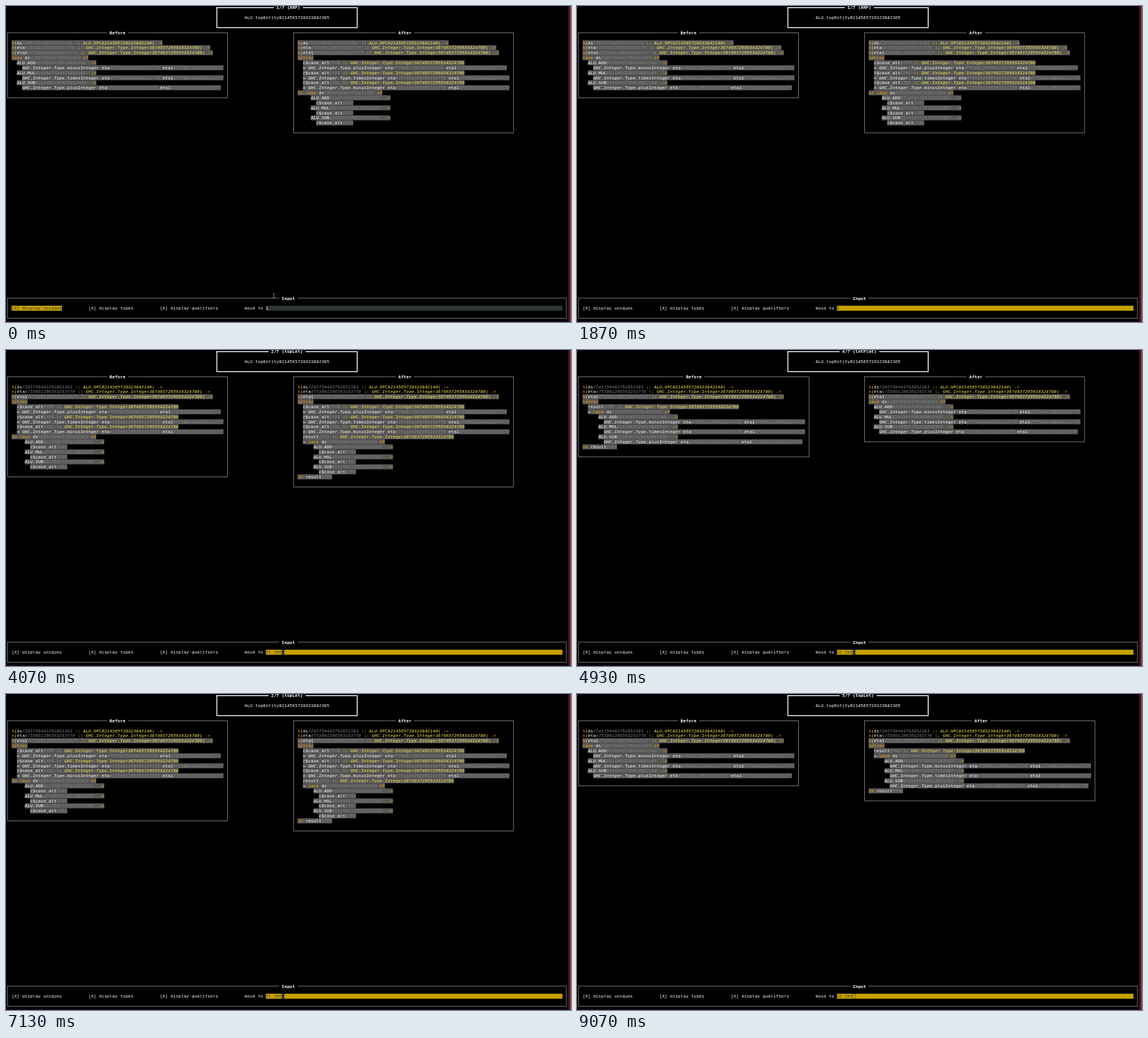
These frames come from a looping animation (1001x559 px, 9190 ms). An HTML page with a canvas:

```html
<!DOCTYPE html>
<html lang="en">
<head>
<meta charset="utf-8">
<title>Rewrite steps</title>
<style>
html, body { margin: 0; width: 100%; height: 100%; overflow: hidden; background: #000; }
canvas { display: block; }
</style>
</head>
<body>
<canvas id="stage" width="1001" height="559"></canvas>
<script>
const ctx = document.getElementById('stage').getContext('2d');
const LOOP = 9190, SCALE = 1001 / 1920, W = 9, H = 17;
const FONT = '14.67px "DejaVu Sans Mono", monospace';
const WHITE = '#fff', GOLD = '#c4a000', DARK = '#2e3436', MARK = '#585858';
const KEYWORD = '#ffa500', TYPE = '#fce94f', UNIQUE = '#808080';

// Terminal cells; column 0 and row 0 are where the left pane's text starts.
const px = col => 19 + col * W;
const py = row => 116 + row * H;

function fill(col, row, width, color) {
  ctx.fillStyle = color;
  ctx.fillRect(px(col), py(row), width * W, H);
}

function print(text, col, row, color = WHITE, style = '') {
  ctx.font = style + ' ' + FONT;
  ctx.fillStyle = color;
  [...text].forEach((ch, i) => {
    if (ch !== ' ') ctx.fillText(ch, px(col + i), py(row) + 13.5);
  });
}

// Lines run through the middle of their cells.
function box(left, top, right, bottom, label, weight = 1) {
  const shift = (weight - 1) / 2;
  const x1 = px(left) + 4 - shift, x2 = px(right) + 4 - shift;
  const y1 = py(top) + 8 - shift, y2 = py(bottom) + 8 - shift;
  ctx.fillStyle = WHITE;
  ctx.fillRect(x1, y1, x2 - x1, weight);
  ctx.fillRect(x1, y2, x2 - x1 + weight, weight);
  ctx.fillRect(x1, y1, weight, y2 - y1);
  ctx.fillRect(x2, y1, weight, y2 - y1);
  const size = label.length + 2;
  const start = left + 1 + Math.ceil((right - left - 1 - size) / 2);
  fill(start, top, size, '#000');
  print(label, start + 1, top, WHITE, 'bold');
}

// Code shown in the panes
const DS = 'ds7205759403792852383';
const INT = 'GHC.Integer.Type.Integer3674937295934324780';
const CASE = `case ${DS} of`;
const head = [
  `λ(${DS} :: ALU.OPC8214565720323842140) ->`,
  `λ(eta4755801206503243778 :: ${INT}) ->`,
  `λ(eta14755801206503243777 :: ${INT}) ->`
];
const call = op => `GHC.Integer.Type.${op}Integer eta4755801206503243778 eta14755801206503243777`;
const ops = ['minus', 'times', 'plus'];
const alts = (indent, body) => ['ADD', 'MUL', 'SUB'].flatMap((name, i) => [
  ' '.repeat(indent) + `ALU.${name}821456572032384230${i + 2}  ->`,
  ' '.repeat(indent + 2) + body(i)
]);
const callOf = i => call(ops[i]);
const altOf = i => 'c$case_alt' + (1792 + i);
const lets = ['letrec', ...[2, 1, 0].flatMap(i => [`  ${altOf(i)} :: ${INT}`, '  = ' + callOf(i)])];
const result = (id, body) => [`  result${id} :: ${INT}`, '  = ' + CASE, ...alts(6, body), 'in result' + id];

const plain = [...head, CASE, ...alts(2, callOf)];
const lifted = [...head, ...lets, 'in ' + CASE, ...alts(5, altOf)];
const named = id => [...head, 'letrec', ...result(id, callOf)];
const steps = {
  1: { name: 'ANF', before: plain, after: lifted },
  2: { name: 'topLet', before: lifted, after: [...head, ...lets, ...result(1795, altOf)] },
  4: { name: 'letFlat', before: named(1795), after: plain },
  5: { name: 'topLet', before: plain, after: named(1796) }
};

const TOKEN = /λ|->|::|\b(?:letrec|case|in|of)\b|(?:ALU|GHC\.Integer\.Type)\.|\d{4}(?:\d{15})?(?!\d)|./g;

function codeLine(line, col, row) {
  let inType = false;
  for (const { 0: tok, index } of line.matchAll(TOKEN)) {
    if (tok === '::') inType = true;
    const unique = /^\d{4}/.test(tok), qualifier = /^\w+.*\.$/.test(tok);
    const color = inType || tok === '(' ? TYPE
      : /^(λ|->|letrec|case|in|of)$/.test(tok) ? KEYWORD
      : unique ? UNIQUE : WHITE;
    print(tok, col + index, row, color, unique || qualifier ? 'italic' : '');
    if (tok === ')') inType = false;
  }
}

function pane(label, lines, col, markFrom) {
  const width = Math.max(...lines.map(l => l.length));
  box(col - 2, -2, col + width + 1, lines.length + 1, label);
  lines.forEach((line, row) => {
    const indent = line.search(/\S/);
    if (row >= markFrom) fill(col + indent, row, line.length - indent, MARK);
    codeLine(line, col, row);
  });
}

const checks = [[0, '[X] display uniques'], [29, '[X] display types'], [56, '[X] display qualifiers']];
const FIELD = 96, FORM = 53;

function form({ focus, text, cursor }) {
  box(-2, 51, 209, 55, 'Input');
  checks.forEach(([col, label], i) => {
    if (focus === i) fill(col, FORM, label.length, GOLD);
    print(label, col, FORM, focus === i ? DARK : WHITE);
  });
  const editing = focus === 3;
  print('move to', 88, FORM);
  fill(FIELD, FORM, 112, editing ? GOLD : DARK);
  print(text, FIELD, FORM, editing ? DARK : WHITE);

  const at = editing ? FIELD + text.length : checks[focus][0] + 1;
  if (cursor === 'block') {
    fill(at, FORM, 1, DARK);
    if (!editing) print('X', at, FORM, GOLD);
  } else if (cursor === 'hollow') {
    ctx.strokeStyle = DARK;
    ctx.lineWidth = 1;
    ctx.strokeRect(px(at) + .5, py(FORM) + .5, W - 1, H - 1);
  }
}

function windowEdges() {
  const rect = (color, ...r) => { ctx.fillStyle = color; ctx.fillRect(...r); };
  rect('#2c0f22', 0, 0, 1, 1072);
  rect('#2c0f22', 0, 1070, 1920, 3);
  rect('#3c1630', 1910, 0, 6, 1072);
  rect('#c8482c', 1917, 0, 3, 1072);
}

function pointer() {
  ctx.fillStyle = '#bbb';
  ctx.fillRect(909.5, 977, 1.5, 13);
  ctx.fillRect(907, 976, 6, 1.5);
  ctx.fillRect(907, 989, 6, 1.5);
}

function draw(s) {
  ctx.setTransform(SCALE, 0, 0, SCALE, 0, 0);
  ctx.fillStyle = '#000';
  ctx.fillRect(0, 0, 1920, 1080);
  const { name, before, after } = steps[s.step];
  box(77, -7, 130, -3, `${s.step}/7 (${name})`, 3);
  print('ALU.topEntity8214565720323842305', 88, -5);
  const markFrom = s.step === 1 ? 0 : 2;
  pane('Before', before, 0, markFrom);
  pane('After', after, 108, markFrom);
  form(s);
  windowEdges();
  if (s.pointer) pointer();
}

// Each entry changes part of the state at its time.
const on = { cursor: 'block' }, off = { cursor: 'none' };
const events = [
  [0, { step: 1, focus: 0, text: '1', cursor: 'none', pointer: true }],
  [200, on],
  [600, { pointer: false }], [670, { focus: 1 }],
  [1000, { focus: 2 }],
  [1400, { focus: 3 }], [1870, off],
  [2330, { text: '', ...on }],
  [2600, { text: '%' }], [2730, { text: '%t' }], [2800, { text: '%t ' }],
  [2930, { text: '%t l' }], [3070, { text: '%t le' }], [3130, { text: '%t let' }],
  [3670, off], [4000, on], [4070, { step: 2 }],
  [4530, off], [4870, on], [4930, { step: 4 }],
  [5470, off], [5540, on], [5600, { step: 5 }],
  [6130, off], [6330, on], [6400, { step: 2 }],
  [6930, off], [7130, on], [7200, { step: 4 }],
  [7730, off], [7930, on], [8000, { step: 5 }],
  [8530, off], [8870, on], [9070, { cursor: 'hollow' }]
];

let shown = 0;
const start = performance.now();
function tick() {
  const t = (performance.now() - start) % LOOP;
  const past = events.filter(([at]) => at <= t);
  if (past.length !== shown) {
    shown = past.length;
    draw(Object.assign({}, ...past.map(([, change]) => change)));
  }
  requestAnimationFrame(tick);
}
tick();
</script>
</body>
</html>
```
